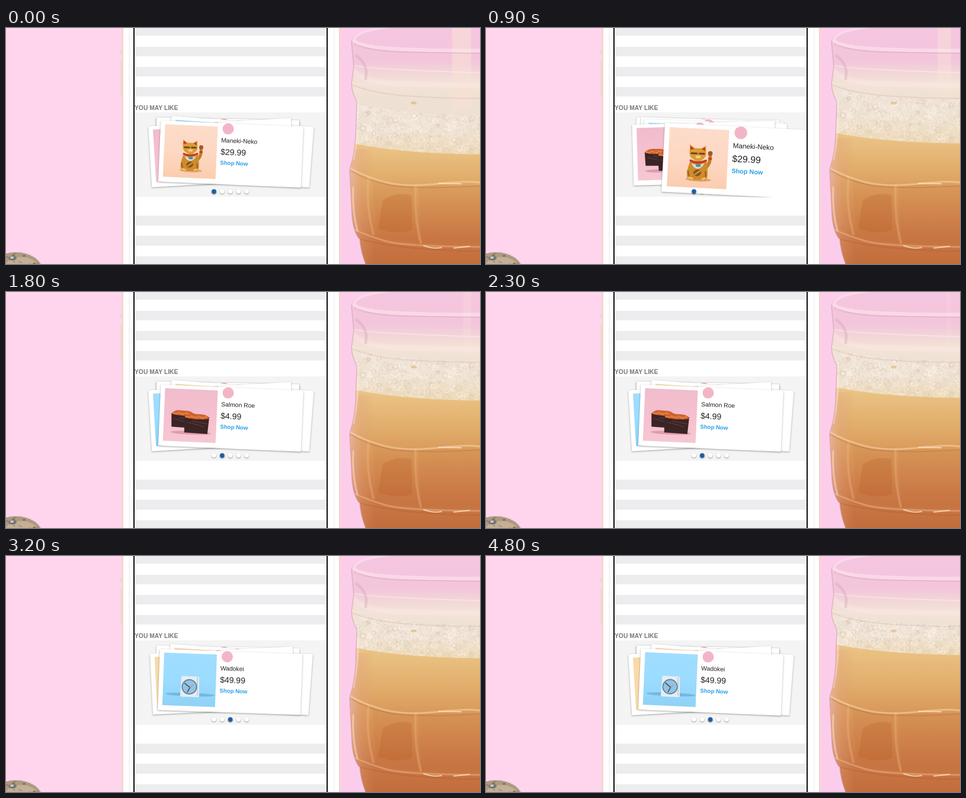
An HTML page with a canvas that plays this animation: 800 by 400 pixels, repeating every 5800 ms.

```html
<!DOCTYPE html>
<html lang="en">
<head>
<meta charset="utf-8">
<title>You may like</title>
<style>
  html, body { margin: 0; width: 100%; height: 100%; overflow: hidden; background: #ffd4ed; }
  canvas { display: block; width: 800px; height: 400px; }
</style>
</head>
<body>
<canvas id="stage" width="800" height="400"></canvas>
<script>
const ctx = document.getElementById('stage').getContext('2d');
const FONT = '"Liberation Sans", Arial, sans-serif';
const LOOP = 5800, STEP = 100, LAST = 4800;
const SWIPES = [680, 2700], SWIPE_TIME = 600;

const lerp = (a, b, k) => a + (b - a) * k;
const smooth = k => k * k * (3 - 2 * k);
const clamp = k => Math.min(1, Math.max(0, k));

function rect(x, y, w, h, color) {
  ctx.fillStyle = color;
  ctx.fillRect(x, y, w, h);
}
function oval(x, y, rx, ry, color, angle = 0) {
  ctx.beginPath();
  ctx.ellipse(x, y, rx, ry, angle, 0, 7);
  ctx.fillStyle = color;
  ctx.fill();
}
function shape(d, color) {
  ctx.fillStyle = color;
  ctx.fill(new Path2D(d));
}
function line(d, color, width = 1) {
  ctx.strokeStyle = color;
  ctx.lineWidth = width;
  ctx.lineCap = 'round';
  ctx.stroke(new Path2D(d));
}
function gradient(x0, y0, x1, y1, colors) {
  const g = ctx.createLinearGradient(x0, y0, x1, y1);
  colors.forEach((c, i) => g.addColorStop(i / (colors.length - 1), c));
  return g;
}
const fade = (y0, y1, ...colors) => gradient(0, y0, 0, y1, colors);
const fadeAcross = (x0, x1, ...colors) => gradient(x0, 0, x1, 0, colors);

function text(str, x, y, size, color, weight = '') {
  ctx.font = `${weight} ${size}px ${FONT}`;
  ctx.fillStyle = color;
  ctx.fillText(str, x, y);
}
function random(seed) {
  return () => (seed = (seed * 16807) % 2147483647) / 2147483647;
}

// Product pictures, centred on 0,0 in an 89 px square
function cat() {
  rect(-44.5, -44.5, 89, 89, fade(-44, 44, '#fddccb', '#fdd8c3', '#fbcdb0'));
  oval(2, 32, 19, 3, '#e2a67b');
  line('M13 13Q19 7 18-4', '#c07e26', 5);
  oval(18, -8, 3.5, 3.5, '#9b5c26');
  oval(18, 0, 3, 1.5, '#c33a25');
  shape('M-11 4Q-20 30-11 33L13 33Q18 28 13 3Z', '#cf8c2c');
  shape('M-13-6L-13-20L-6-15L4-15L11-19L12-5Q9 3 0 4Q-11 3-13-6Z', '#dc9c35');
  shape('M-12-12L-12-18L-6-14ZM10-11L10-17L5-14Z', '#c93626');
  line('M-10-7L-2-7M2-7L9-7', '#6d4223', 2.6);
  oval(0, -2, 4, 2, '#efcf8d');
  line('M-11 4Q0 10 12 3', '#c8372b', 3);
  shape('M-9 8Q1 12 10 7Q7 15 0 16Q-7 15-9 8Z', '#d9ddd4');
  oval(1, 11, 4, 2, '#4c8e9d');
  oval(0, 22, 6, 5, '#8d5421', -.4);
  line('M-4 25L4 19', '#e2b44f', 1.5);
  line('M-14 20L-12 27M12 20L13 27', '#9a5f22', 2);
  line('M-12 30L-7 31M8 31L12 30', '#f0c162', 3);
}
function roePiece(x, y, w, h) {
  shape(`M${x} ${y + 5}L${x + w} ${y + 4}L${x + w - 2} ${y + h}L${x + 1} ${y + h - 1}Z`, '#3b2426');
  line(`M${x + 5} ${y + 14}L${x + w - 8} ${y + 21}M${x + 14} ${y + 12}L${x + w - 3} ${y + 16}`, '#604140', 1);
  shape(`M${x} ${y + 6}Q${x + 5} ${y - 2} ${x + w / 2} ${y}Q${x + w - 2} ${y - 1} ${x + w} ${y + 7}Q${x + w / 2} ${y + 11} ${x} ${y + 6}Z`, '#cf602d');
  for (let i = 4; i < w - 2; i += 4) oval(x + i, y + 4 + (i % 3), 1.8, 1.6, '#ec8643');
}
function salmon() {
  rect(-44.5, -44.5, 89, 89, fade(-44, 44, '#f1bccb', '#f5c0cf', '#f6c7d2'));
  oval(2, 29, 34, 3, '#dd9aae');
  roePiece(-32, -8, 38, 29);
  roePiece(-10, -3, 42, 33);
}
function clock() {
  rect(-44.5, -44.5, 89, 89, fade(-44, 44, '#a0ddff', '#9bdcff', '#90d2f6'));
  oval(2, 25, 42, 3, '#73b9df');
  shape('M-14-4Q-14-6-12-6L14-6Q16-6 16-4L17 27Q17 29 15 29L-12 29Q-15 29-15 27Z', '#e5edf4');
  line('M13-4L14 26', '#c4d1dd', 2);
  oval(0, 12, 13, 13, '#627c91');
  oval(0, 12, 11.3, 11.3, '#91c4e4');
  line('M-8 6L1 13L-3 21', '#42515f', 1.6);
  line('M1 13L6 8', '#db7f61', 1);
}
const plain = color => () => rect(-44.5, -44.5, 89, 89, color);

const products = [
  { name: 'Maneki-Neko', price: '$29.99', picture: cat },
  { name: 'Salmon Roe', price: '$4.99', picture: salmon },
  { name: 'Wadokei', price: '$49.99', picture: clock },
  { name: '', price: '', picture: plain('#f9daab') },
  { name: '', price: '', picture: plain('#f8d5bd') }
];

// Resting places in the pile, front first
const slots = [
  { x: 379.5, y: 214, turn: 2.5 },
  { x: 363.5, y: 211.5, turn: -3.4 },
  { x: 395.5, y: 210, turn: 4.4 },
  { x: 373.5, y: 206, turn: 1.2 },
  { x: 373.5, y: 206, turn: 1.2 }
];

function card(product, { x, y, turn, scale = 1 }) {
  ctx.save();
  ctx.translate(x, y);
  ctx.rotate(turn * Math.PI / 180);
  ctx.scale(scale, scale);
  ctx.shadowColor = 'rgba(0,0,0,.35)';
  ctx.shadowBlur = 3;
  ctx.shadowOffsetY = 1;
  rect(-120.5, -52, 241, 103.5, '#fff');
  ctx.shadowColor = 'transparent';
  ctx.save();
  ctx.translate(-68.5, -1.5);
  product.picture();
  ctx.restore();
  oval(-6.4, -42.8, 9.5, 9.5, '#f3b5c5');
  text(product.name, -17.4, -19.5, 10.4, '#222');
  text(product.price, -17.4, 1.3, 14, '#222');
  text('Shop Now', -17.4, 18.2, 9.6, '#2a9fe8', 'bold');
  ctx.restore();
}

function pile(t) {
  const steps = SWIPES.map(start => smooth(clamp((t - start) / SWIPE_TIME)));
  const done = steps.filter(p => p === 1).length;
  const p = done < steps.length ? steps[done] : 0;

  const dot = (i, color) => {
    ctx.shadowColor = 'rgba(0,0,0,.4)';
    ctx.shadowBlur = 2;
    ctx.shadowOffsetY = 1;
    oval(351 + i * 13.8, 277, 3.8, 3.8, color);
    ctx.shadowColor = 'transparent';
  };
  for (let i = 0; i < 5; i++) dot(i, '#fff');

  ctx.save();
  ctx.beginPath();
  ctx.rect(217, 142, 324, 145);
  ctx.clip();
  const fling = (p / .28) ** 3;
  for (let depth = 4; depth >= 0; depth--) {
    const a = slots[depth], b = slots[depth - 1];
    const place = depth
      ? { x: lerp(a.x, b.x, p), y: lerp(a.y, b.y, p), turn: lerp(a.turn, b.turn, p) }
      : { x: a.x + 43 * fling, y: a.y + 9.5 * Math.min(fling, 2), turn: a.turn + .3 * Math.min(fling, 3),
          scale: 1 + .1 * Math.min(fling, 1.5) };
    card(products[(done + depth) % 5], place);
  }
  ctx.restore();
  dot(done + (p > .5), '#1b5fa8');
}

function phone() {
  const gold = '#edd6c6';
  rect(193.5, 38, 3, 7, gold);
  rect(193.5, 57, 3, 57, gold);
  rect(563, 37, 3.5, 7, gold);
  rect(196, 0, 368.5, 400, gold);
  rect(198, 0, 364, 400, '#fff');
  rect(207, 0, 3, 400, '#f5f4f6');
  rect(553, 0, 2, 400, '#f5f4f6');
  rect(215, 0, 328, 400, '#0b0b0b');
  rect(217, 0, 324, 400, '#fff');
  [[0, 13], [32, 48], [66, 82], [100, 116], [318, 335], [352, 369], [387, 400]]
    .forEach(([a, b]) => rect(217, a, 324, b - a, '#edecee'));
  rect(217, 143, 324, 143, '#f4f4f4');
  text('YOU MAY LIKE', 217, 138.5, 10.3, '#777', 'bold');
}

function egg() {
  oval(17, 412, 45, 32, '#ad9a82');
  oval(26, 410, 30, 22, '#c3b097');
  const rnd = random(41);
  for (let i = 0; i < 45; i++) {
    const a = rnd() * 6.3, r = Math.sqrt(rnd()), s = .4 + rnd() * 1.2;
    oval(17 + 42 * r * Math.cos(a), 412 + 30 * r * Math.sin(a), s * 1.4, s, 'rgba(105,88,66,.7)');
  }
  oval(11, 390, 7, 4, '#77756f');
  oval(10, 389, 3, 2, '#c3c8cb');
}

const glass = new Path2D('M583 22Q584 4 640-2L800-2L800 400L607 400Q599 380 597 358Q587 348 584 320L580 240Q588 215 590 185L592 125Q584 110 583 95L587 66Z');

function drink(t) {
  const bottom = 154 + 51 * Math.exp(-t / 2000);
  const top = 108 + 30 * Math.exp(-t / 500);
  const surface = y => `M570 ${y - 13}Q660 ${y + 8} 800 ${y + 9}`;
  ctx.save();
  ctx.clip(glass);
  rect(570, 0, 230, 400, fade(0, 100, '#f6c6e0', '#f3c5dc', '#f1cfd8'));

  // Cream, then tea, then the band of bubbles between them
  rect(570, 62, 230, 150, fade(62, 125, 'rgba(243,222,214,.2)', '#f2e3d6', '#eee0d2'));
  shape(surface(bottom) + 'V400H570Z', fade(bottom, 400, '#eac283', '#e1ad6b', '#d69255', '#cb7b47', '#c26d3c'));
  ctx.save();
  ctx.clip(new Path2D(`${surface(top)}V${bottom + 9}Q660 ${bottom + 8} 570 ${bottom - 13}Z`));
  rect(570, 80, 230, 150, fade(top, bottom + 8, '#efe3d7', '#eee1d1', '#ecd8b6'));
  const rnd = random(77);
  for (let i = 0; i < 300; i++) {
    const x = 588 + rnd() * 214, y = lerp(top - 4, bottom + 8, rnd()), r = 1.6 + rnd() * 3.4;
    ctx.beginPath();
    ctx.arc(x, y, r, 0, 7);
    ctx.strokeStyle = i % 3 ? 'rgba(255,250,242,.5)' : 'rgba(201,179,158,.35)';
    ctx.lineWidth = 1;
    ctx.stroke();
  }
  ctx.restore();

  const pour = clamp(1 - t / 3100);
  rect(785 - 32 * pour, 0, 32 * pour, top, `rgba(249,226,213,${.6 * pour})`);

  // Moulded panels
  rect(575, bottom, 50, 400 - bottom, fadeAcross(578, 622, 'rgba(240,190,190,.65)', 'rgba(226,160,130,.3)', 'rgba(220,150,110,0)'));
  shape('M636 292Q660 276 684 284L686 342Q660 352 628 340Z', 'rgba(176,78,24,.2)');
  shape('M618 254Q660 266 690 263L696 362Q650 362 626 352Z', 'rgba(180,90,40,.08)');
  shape('M696 266H800V364H702Z', 'rgba(180,90,40,.08)');
  line('M580 237Q605 252 640 261T730 264T800 262', 'rgba(250,216,170,.55)', 3);
  line('M582 242Q608 258 645 266T800 268', 'rgba(163,84,40,.28)', 1.5);
  line('M612 253Q607 300 620 349M691 266Q689 320 700 364', 'rgba(244,190,135,.3)', 4);
  line('M584 340Q610 352 640 361T800 371', 'rgba(246,196,155,.4)', 3);
  line('M598 358Q640 369 700 374T800 378', 'rgba(153,71,35,.22)', 2);
  line('M705 369Q722 375 735 372M756 373L782 370M730 263L768 264', 'rgba(255,233,207,.7)', 2);
  line('M586 270Q584 310 593 343', 'rgba(255,226,213,.5)', 3);
  line('M594 125Q596 175 586 222', 'rgba(255,232,230,.4)', 4);

  // Rim and neck
  line('M586 72Q600 94 680 95T800 98', 'rgba(255,232,235,.35)', 9);
  line('M584 96Q620 112 690 116T800 119', 'rgba(218,176,176,.35)', 2);
  line('M588 64Q620 70 800 76', 'rgba(255,240,245,.35)', 2.5);
  line('M592 48Q612 62 607 86', 'rgba(202,154,162,.3)', 5);
  line('M588 22Q600 33 670 36T800 38', 'rgba(255,230,239,.6)', 6);
  line('M588 27Q615 40 680 41T800 43', 'rgba(211,159,182,.5)', 1.5);
  line('M588 20Q590 5 642-1', 'rgba(255,231,241,.6)', 4);
  oval(688, 127, 5, 2.5, 'rgba(211,170,113,.5)');
  ctx.restore();
  line('M583 22L587 66L583 95Q584 110 592 125L590 185Q588 215 580 240L584 320Q587 348 597 358Q599 380 607 400', 'rgba(203,148,159,.5)', 1.5);
}

function draw(t) {
  rect(0, 0, 800, 400, '#ffd4ed');
  rect(565, 0, 235, 400, '#fccdea');
  egg();
  drink(t);
  phone();
  pile(t);
}

function tick(now) {
  draw(Math.min(LAST, Math.floor((now % LOOP) / STEP) * STEP));
  requestAnimationFrame(tick);
}
draw(0);
requestAnimationFrame(tick);
</script>
</body>
</html>
```
